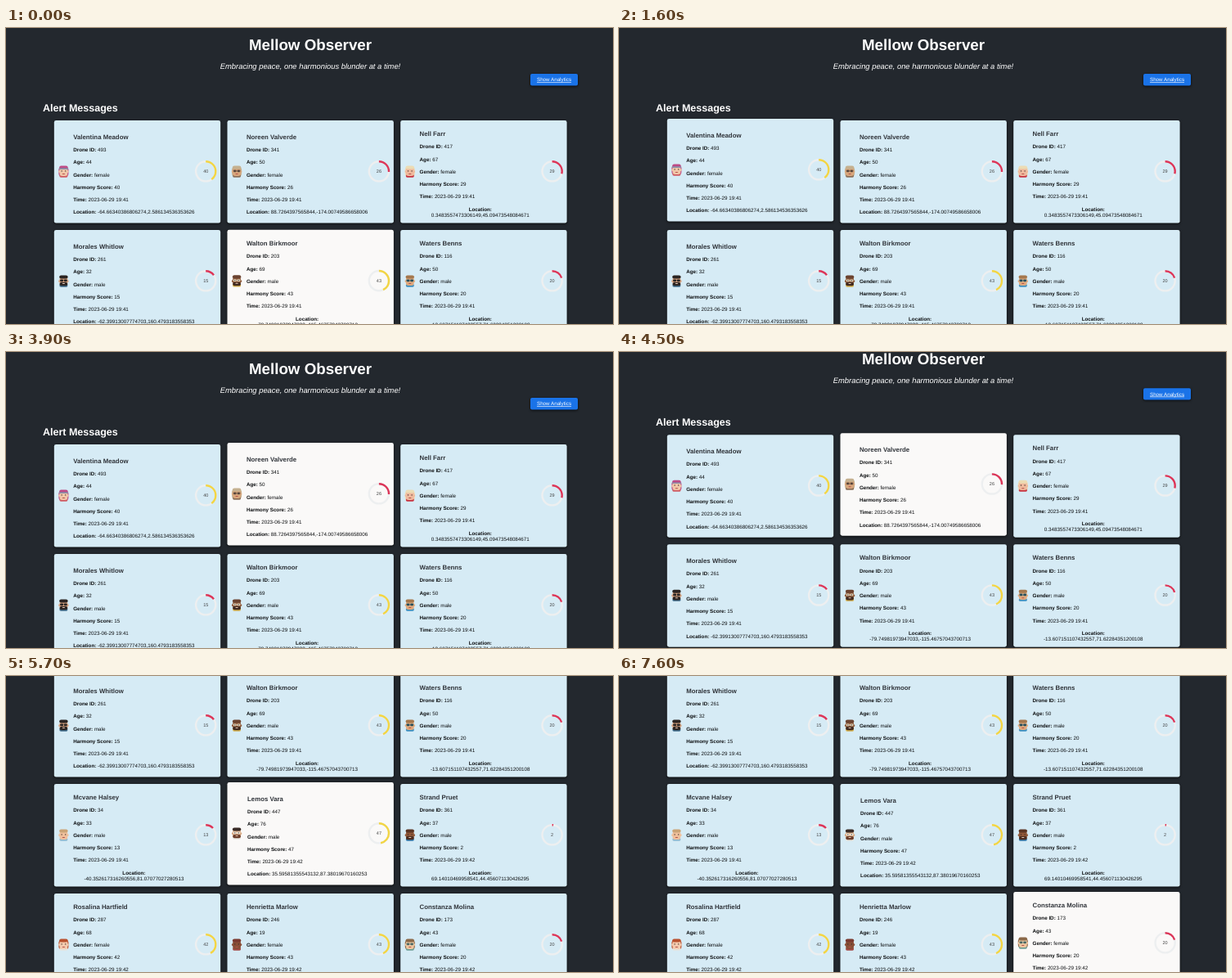
Write an HTML page that moves like this. It is 742 px wide and 362 px high and loops after 8000 ms.

```html
<!DOCTYPE html>
<html lang="en">
<head>
<meta charset="utf-8">
<title>Mellow Observer</title>
<style>
  html, body { margin: 0; width: 100%; height: 100%; overflow: hidden; background: #23282e; }
  svg { display: block; font-family: "Liberation Sans", Arial, sans-serif; font-size: 6.256px; text-rendering: geometricPrecision; }
  .title { font-size: 18.77px; font-weight: bold; }
  .tagline { font-size: 9.385px; font-style: italic; }
  .heading { font-size: 12.51px; font-weight: bold; }
  .light { fill: #fff; }
  .mid { text-anchor: middle; }
  .panel { filter: drop-shadow(0 1.6px 1.4px rgba(0, 0, 0, .75)); }
  .name { font-size: 7.82px; font-weight: bold; fill: #30343a; }
  .label { font-weight: bold; }
  .score { font-size: 5.5px; fill: #444; text-anchor: middle; }
  .line { fill: #0c0e10; }
</style>
</head>
<body>
<svg id="stage" width="742" height="362" viewBox="0 0 742 362">
  <rect width="742" height="362" fill="#23282e"/>
  <g id="page">
    <text class="title light mid" x="372" y="27">Mellow Observer</text>
    <text class="tagline light mid" x="372" y="49.7">Embracing peace, one harmonious blunder at a time!</text>
    <rect class="panel" x="641" y="56" width="58" height="14.4" rx="2" fill="#1a73e8"/>
    <text class="light mid" x="670" y="65.4" text-decoration="underline">Show Analytics</text>
    <text class="heading light" x="45" y="102">Alert Messages</text>
  </g>
</svg>
<script>
const LOOP = 8000;
const BLUE = [214, 235, 245], WHITE = [250, 249, 248];
const LIFT_MS = 120, FADE_MS = 300;
const CARD_W = 203.4, CARD_H = 125.6;

// hover: [enter, leave] times in ms; loc is one line unless wrap is set
const people = [
  { name: "Valentina Meadow", id: 493, age: 44, sex: "female", score: 40, time: "19:41",
    loc: "-64.66340386806274,2.586134536353626", hover: [[1480, 2600], [2980, 3300]],
    look: { skin: "#f1c6a8", hair: "#bd4a86", shirt: "#cf5b62", hat: "#8a8fa8", long: 1 } },
  { name: "Noreen Valverde", id: 341, age: 50, sex: "female", score: 26, time: "19:41",
    loc: "88.7264397565844,-174.00749586658006", hover: [[3340, 4700]],
    look: { skin: "#d9a77c", hair: "#c5b190", shirt: "#8b6f58", long: 1, glasses: "#6b5547" } },
  { name: "Nell Farr", id: 417, age: 67, sex: "female", score: 29, time: "19:41", wrap: 1,
    loc: "0.3483557473306149,45.09473548084671",
    look: { skin: "#efb99d", hair: "#ecdcb4", shirt: "#c8333f", long: 1 } },
  { name: "Morales Whitlow", id: 261, age: 32, sex: "male", score: 15, time: "19:41",
    loc: "-62.39913007774703,160.4793183558353", hover: [[760, 1180]],
    look: { skin: "#d8a380", hair: "#2b2422", shirt: "#3e6c8c", beard: "#2b2422", glasses: "#222" } },
  { name: "Walton Birkmoor", id: 203, age: 69, sex: "male", score: 43, time: "19:41", wrap: 1,
    loc: "-79.74981973947033,-115.46757043700713", hover: [[-900, -110]],
    look: { skin: "#8d5a3b", hair: "#6b4330", shirt: "#d4b04c", beard: "#40291f", glasses: "#e6d9c0" } },
  { name: "Waters Benns", id: 116, age: 50, sex: "male", score: 20, time: "19:41", wrap: 1,
    loc: "-13.607151107432557,71.62284351200108",
    look: { skin: "#e0aa7e", hair: "#a5784e", shirt: "#3c8fc0", glasses: "#245d70" } },
  { name: "Mcvane Halsey", id: 34, age: 33, sex: "male", score: 13, time: "19:41", wrap: 1,
    loc: "-40.352617316260556,81.07077027280513",
    look: { skin: "#efc09c", hair: "#cba476", shirt: "#8fb9d0" } },
  { name: "Lemos Vara", id: 447, age: 76, sex: "male", score: 47, time: "19:42", x: 24.6,
    loc: "35.59581355543132,87.38019670160253", hover: [[4930, 5720]],
    look: { skin: "#d7a780", hair: "#3a2c27", shirt: "#e4e2da", beard: "#6b3d2a", glasses: "#f2eee2" } },
  { name: "Strand Pruet", id: 361, age: 37, sex: "male", score: 2, time: "19:42", wrap: 1,
    loc: "69.14010469958541,44.456071130426295", hover: [[6060, 6850]],
    look: { skin: "#8f5738", hair: "#5b3524", shirt: "#2f78ad", beard: "#4b2c20" } },
  { name: "Rosalina Hartfield", id: 287, age: 68, sex: "female", score: 42, time: "19:42", wrap: 1,
    look: { skin: "#f3c9ad", hair: "#b9512f", shirt: "#e7e3dc", long: 1 } },
  { name: "Henrietta Marlow", id: 246, age: 19, sex: "female", score: 43, time: "19:42", wrap: 1,
    look: { skin: "#8a4f37", hair: "#7b3a30", shirt: "#a34a45" } },
  { name: "Constanza Molina", id: 173, age: 43, sex: "female", score: 20, time: "19:42", wrap: 1,
    hover: [[7130, 9000]],
    look: { skin: "#efc6a0", hair: "#8c6a4a", shirt: "#6f9f95", long: 1, glasses: "#57807c" } }
];

const page = document.getElementById("page");
const clamp = v => Math.max(0, Math.min(1, v));

function add(parent, tag, attrs, text) {
  const el = document.createElementNS("http://www.w3.org/2000/svg", tag);
  for (const key in attrs) el.setAttribute(key, attrs[key]);
  if (text !== undefined) el.textContent = text;
  parent.appendChild(el);
  return el;
}

function addLine(parent, x, y, label, value) {
  const line = add(parent, "text", { class: "line", x, y });
  add(line, "tspan", { class: "label" }, label + ":");
  add(line, "tspan", {}, " " + value);
}

function addAvatar(parent, look) {
  const g = add(parent, "g", { transform: "translate(11.6 62.5)" });
  const box = (x, y, width, height, rx, fill) => add(g, "rect", { x, y, width, height, rx, fill });
  if (look.long) box(-6, -5.6, 12, 11.6, 3.4, look.hair);
  box(-5, 3.6, 10, 3.6, 1.6, look.shirt);
  box(-6.2, -1.2, 12.4, 2.8, 1.3, look.skin);
  box(-4.9, -5, 9.8, 10.4, 3, look.skin);
  if (look.beard) box(-4.8, 1.6, 9.6, 4.2, 2, look.beard);
  box(-5.2, -7, 10.4, 4, 2.2, look.hair);
  if (look.hat) box(-5.6, -4.2, 11.2, 1.6, .6, look.hat);
  for (const x of [-2.3, 2.3]) {
    if (look.glasses) box(x - 1.9, -2.1, 3.8, 2.8, .9, look.glasses);
    box(x - .65, -1.3, 1.3, 1.3, .6, "#3a2c28");
  }
  box(-1.6, 2.5, 3.2, 1, .5, look.beard ? "#e9c9b4" : "#b5524c");
}

function addRing(parent, score) {
  const r = 12.1, ring = add(parent, "g", { transform: "translate(185.4 62.3)" });
  const stroke = { r, fill: "none", "stroke-width": 2.4 };
  add(ring, "circle", { ...stroke, stroke: "#edeff0" });
  add(ring, "circle", { ...stroke, stroke: score < 30 ? "#dc3558" : "#f2d544", pathLength: 100,
    "stroke-dasharray": score + " 100", transform: "rotate(-90)" });
  add(ring, "text", { class: "score", y: 2 }, score);
}

function addCard(p, i) {
  const x0 = 58.8 + i % 3 * 211.7, y0 = 113 + Math.floor(i / 3) * 134;
  const g = add(page, "g", {});
  const panel = add(g, "rect", { class: "panel", width: CARD_W, height: CARD_H, rx: 2.4 });
  const x = p.x || 23.4, top = p.wrap ? 34.4 : 38.1;
  addAvatar(g, p.look);
  add(g, "text", { class: "name", x, y: top - 15.5 }, p.name);
  const rows = [["Drone ID", p.id], ["Age", p.age], ["Gender", p.sex],
    ["Harmony Score", p.score], ["Time", "2023-06-29 " + p.time]];
  rows.forEach(([label, value], n) => addLine(g, x, top + n * 15.26, label, value));
  const y = top + 76.3;
  if (p.wrap) {
    add(g, "text", { class: "line label mid", x: 97.6, y }, "Location:");
    add(g, "text", { class: "line mid", x: 97.6, y: y + 7.1 }, p.loc || "");
  } else {
    addLine(g, x, y, "Location", p.loc);
  }
  addRing(g, p.score);
  return { g, panel, x0, y0, hover: p.hover || [] };
}

const cards = people.map(addCard);

// Strongest hover level at time t, with the given delay and duration
function level(hover, t, delay, ms) {
  return hover.reduce((top, [enter, leave]) => Math.max(top, Math.min(
    clamp((t - enter - delay) / ms), 1 - clamp((t - leave - delay) / ms))), 0);
}

function scrollAt(t) {
  const k = clamp((t - 4381) / 526);
  return 249 * (k < .5 ? 4 * k ** 3 : 1 - 4 * (1 - k) ** 3);
}

function draw(t) {
  page.setAttribute("transform", `translate(0 ${-scrollAt(t)})`);
  for (const c of cards) {
    const lift = 2 * level(c.hover, t, 0, LIFT_MS);
    const fade = level(c.hover, t, LIFT_MS, FADE_MS);
    const rgb = BLUE.map((v, n) => Math.round(v + (WHITE[n] - v) * fade));
    c.g.setAttribute("transform", `translate(${c.x0} ${c.y0 - lift})`);
    c.panel.setAttribute("fill", `rgb(${rgb})`);
  }
}

function tick() {
  draw(performance.now() % LOOP);
  requestAnimationFrame(tick);
}
tick();
</script>
</body>
</html>
```
